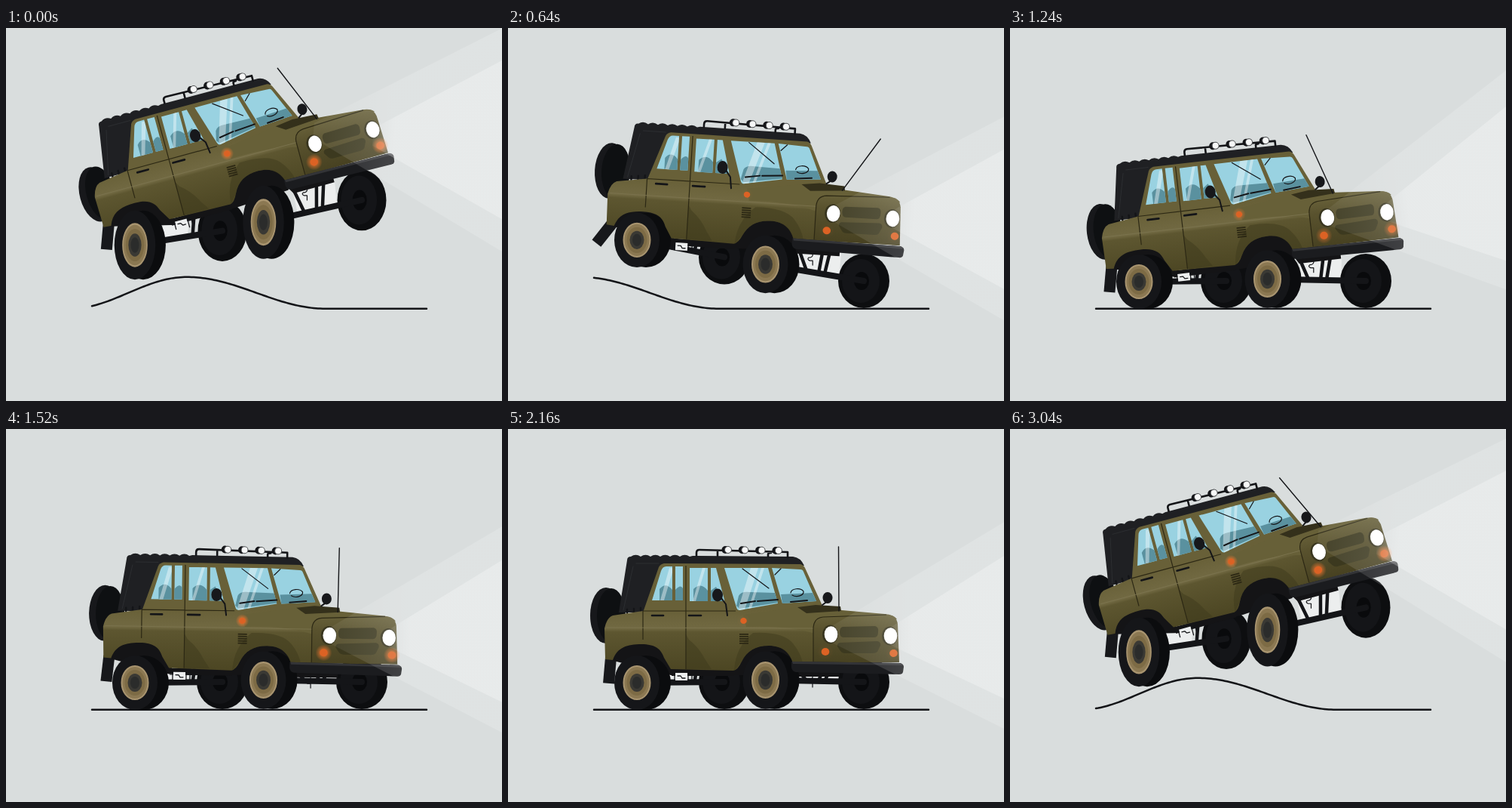
Animation of 658x494 px, one loop 3.08 s. Source, as an HTML page:

```html
<!DOCTYPE html>
<html lang="en">
<head>
<meta charset="utf-8">
<title>Off-road jump</title>
<style>
html, body { margin: 0; width: 100%; height: 100%; overflow: hidden; background: #d9dddd; }
svg { display: block; width: 100vw; height: 100vh; }
.line { fill: none; stroke: #141518; stroke-linecap: round; stroke-linejoin: round; }
.seam { fill: none; stroke: #2c2814; stroke-width: 1.2; }
.dark { fill: #17181b; }
</style>
</head>
<body>
<svg viewBox="0 0 658 494">
  <defs>
    <linearGradient id="side" x1="0" y1="240" x2="0" y2="320" gradientUnits="userSpaceOnUse">
      <stop offset="0" stop-color="#686038"/>
      <stop offset=".3" stop-color="#716942"/>
      <stop offset=".36" stop-color="#5d5630"/>
      <stop offset="1" stop-color="#4c4623"/>
    </linearGradient>
    <linearGradient id="face" x1="0" y1="246" x2="0" y2="310" gradientUnits="userSpaceOnUse">
      <stop offset="0" stop-color="#676039"/>
      <stop offset=".3" stop-color="#59522e"/>
      <stop offset="1" stop-color="#474121"/>
    </linearGradient>
    <linearGradient id="wide" x1="428" x2="530" gradientUnits="userSpaceOnUse">
      <stop offset="0" stop-color="#fff" stop-opacity=".05"/>
      <stop offset="1" stop-color="#fff" stop-opacity=".17"/>
    </linearGradient>
    <linearGradient id="narrow" x1="507" x2="535" gradientUnits="userSpaceOnUse">
      <stop offset="0" stop-color="#fff" stop-opacity=".04"/>
      <stop offset="1" stop-color="#fff" stop-opacity=".27"/>
    </linearGradient>
    <radialGradient id="glow">
      <stop offset=".3" stop-color="#ff7a30" stop-opacity=".7"/>
      <stop offset="1" stop-color="#ff7a30" stop-opacity="0"/>
    </radialGradient>
    <g id="near">
      <ellipse cx="12" rx="33" ry="36" fill="#0b0c0e"/>
      <ellipse rx="30" ry="36" fill="#151619"/>
      <ellipse rx="17.5" ry="22" fill="#8b7852" stroke="#a8946f" stroke-width="2"/>
      <ellipse rx="13.5" ry="17" fill="#7d6b45"/>
      <ellipse rx="9.5" ry="12" fill="#3a3934"/>
      <ellipse rx="6" ry="8" fill="#2b2c2b"/>
    </g>
    <g id="far">
      <ellipse rx="34" ry="36" fill="#0d0e10"/>
      <ellipse cx="-4" rx="25" ry="29" fill="#141518"/>
      <ellipse cx="-3" rx="10" ry="12" fill="#090a0c"/>
    </g>
    <g id="roofLamp">
      <circle cx="-2.5" r="5" fill="#141518"/>
      <circle cx="1" r="4.5" fill="#f6f7f7" stroke="#4a4c4e"/>
    </g>
    <g id="signal">
      <circle class="glow" r="11" fill="url(#glow)"/>
      <ellipse rx="5.3" ry="5" fill="#dc6224"/>
    </g>
    <g id="headlight">
      <ellipse cx="-1" rx="10.5" ry="12.5" fill="#38351f"/>
      <ellipse rx="8.8" ry="10.8" fill="#fff"/>
    </g>
  </defs>

  <path id="road" class="line" stroke-width="2.5"/>
  <path id="gaps" fill="#eceeee"/>
  <use id="farRear" href="#far"/>
  <use id="farFront" href="#far"/>
  <path id="axles" class="line" stroke-width="8"/>
  <path id="shocks" class="line" stroke-width="4.5"/>
  <path id="hose" class="line" stroke-width="1.2"/>

  <!-- underside, behind the near wheels -->
  <g class="body">
    <path id="flap" class="dark" d="M129 303H144V337H129Z"/>
    <path fill="#141416" d="M136 306L148 280H205L220 318H300L318 282H368L384 314L378 322L310 326H216ZM217 318H300V327H217ZM378 318H440V328H384Z"/>
    <path fill="#eceeee" d="M222 323H238V333H222Z"/>
    <path class="line" stroke-width="1.3" d="M221 333V322M225 327H229L231 330H235M239 322V335M244 322V333"/>
    <g id="spare">
      <ellipse class="dark" cx="130" cy="247" rx="21" ry="37"/>
      <ellipse cx="137" cy="247" rx="19" ry="36" fill="#0e1012"/>
    </g>
  </g>

  <use id="rear" href="#near"/>
  <use id="front" href="#near"/>

  <g class="body">
    <path id="canvas" fill="#1f2023"/>
    <path class="line" style="stroke:#2c2e31" d="M166 182L153 240M170 178H200"/>
    <path class="line" stroke-width="2.5" d="M158 239V244M167 238V243M176 237V242"/>

    <g id="rack">
      <path class="line" stroke-width="2.6" d="M250 168V164Q250 160 254 160L371 163V170M278 161V168M345 169V166Q345 164 349 164"/>
    </g>

    <!-- cabin -->
    <path fill="#686038" d="M179 243L200 183Q202 179 207 178L388 179Q392 180 394 184L418 236L400 254H179Z"/>
    <path fill="#99d2e1" d="M191 227L203 188Q205 182 210 182H218V227ZM222 182H232V227H222ZM241 184H265V228H241ZM269 184H276L287 226V228H269Z
      M287 184H345L358 231L307 240Q304 240 303 236ZM350 184L388 186Q391 186 392 189L409 228L364 231Z"/>
    <path fill="#5a919f" d="M201 227V212Q209 202 218 213V227ZM222 213Q229 205 232 211V227H222ZM246 228V212Q256 202 265 214V228ZM269 214L276 209L286 226V228H269Z
      M306 221Q309 215 320 216L354 217L358 230L307 238L303 234ZM362 219L404 217L409 228L364 231Z"/>
    <path fill="#fff" opacity=".4" d="M322 184H332L314 239L307 240L306 236ZM336 184H340L323 237L319 238ZM214 184H218V190L207 227H202ZM258 184H262L249 228H245Z"/>
    <path class="line" stroke-width="1.2" d="M311 185L346 211M362 185L354 193M375 217A9 6 0 0 1 392 215A9 6 0 0 1 377 220"/>
    <path class="line" stroke-width="2" d="M331 228L358 226M375 229L397 227M309 231L328 228"/>

    <!-- body panels -->
    <path fill="url(#side)" d="M128 264Q131 250 139 247L179 241H305L398 238L410 252L412 310H378C374 296 364 287 346 287C328 287 317 294 310 308
      Q305 319 299 320L216 318L207 303C203 291 195 285 177 285C158 285 145 289 139 306L129 305Z"/>
    <path fill="#3e3a1c" opacity=".5" d="M240 279Q254 290 262 306L270 318L236 318V272ZM325 270Q365 268 378 284Q388 296 391 310H378Q370 287 346 287Q320 287 310 308L300 320Q302 288 325 270Z"/>
    <path fill="#676038" d="M312 246L383 236L443 240L500 245Q512 246 516 252L412 256L404 270Q370 260 316 262Z"/>
    <path fill="#34301b" d="M384 236L408 233L441 235L442 241L396 244Z"/>
    <path fill="url(#face)" d="M405 263Q406 250 418 249L502 246Q515 246 517 258L519 309H405Z"/>
    <path fill="#3c391f" d="M444 262L487 261Q492 262 491 269Q491 276 486 276H445Q440 276 440 269Q440 263 444 262Z
      M440 283L490 281Q495 282 494 287L490 295Q488 297 484 297H447Q443 297 441 294L437 288Q436 284 440 283Z"/>
    <path class="seam" d="M405 308V263Q406 250 418 249L502 246M179 241V279M236 181V318M179 241H302"/>
    <path class="line" stroke-width=".8" style="stroke:#7d7550" d="M131 263L404 264"/>
    <path class="line" stroke-width="2.7" d="M191 247H206M240 247H256"/>
    <path class="seam" style="stroke-width:12" stroke-dasharray="1.8 1.2" d="M313 271V285"/>

    <!-- bumper -->
    <path fill="#1b1c1f" d="M376 308L520 310Q525 311 525 315L524 322Q523 325 519 325L382 322Q377 321 376 316Z"/>
    <path fill="#333437" d="M377 308L521 310L524 313L378 311Z"/>

    <!-- mirrors -->
    <path class="line" stroke-width="2" d="M283 224L289 232L291 247M424 228L417 233"/>
    <ellipse class="dark" cx="278" cy="220" rx="7" ry="8.5"/>
    <ellipse class="dark" cx="424" cy="223.500" rx="6.500" ry="7.500"/>

    <!-- lights -->
    <use href="#headlight" x="428.500" y="272"/>
    <use href="#headlight" x="507.500" y="274"/>
    <use href="#signal" x="421" y="295"/>
    <use href="#signal" x="511.500" y="297"/>
    <use href="#signal" transform="translate(312.5 254) scale(.8)"/>

    <path id="antenna" class="line" stroke-width="1.4" d="M439 241L438.500 156"/>
    <g id="beam">
      <path fill="url(#wide)" d="M428 262L950 -53V543L428 282Z"/>
      <path fill="url(#narrow)" d="M507 263L950 -16V494L507 286Z"/>
    </g>
  </g>
</svg>
<script>
const LOOP = 3080, GROUND = 371.8;
const $ = id => document.getElementById(id);
const set = (id, value, name = 'transform') => $(id).setAttribute(name, value);

// Each wheel flies on its own parabola between leaving and touching the ground.
const wheels = {
  rear: { x: 171, y: 336, size: 1, give: .27, start: -200, land: 880, height: 80 },
  front: { x: 341.5, y: 332.5, size: 1.06, give: .27, start: -240, land: 690, height: 98 },
  farRear: { x: 287, y: 335, size: 1, give: .12, start: -220, land: 730, height: 93 },
  farFront: { x: 472, y: 335, size: 1, give: .12, start: -300, land: 640, height: 123 }
};
const frame = { start: -260, land: 720, height: 111 };

const clamp = u => Math.max(0, Math.min(1, u));
const mix = (p, q, f) => p.map((v, i) => v + (q[i] - v) * f);

function ramp(t, from, to) {
  const u = clamp((t - from) / (to - from));
  return u * u * (3 - 2 * u);
}
const pulse = (t, a, b, c, d) => ramp(t, a, b) - ramp(t, c, d);

function hop(t, { start, land, height }) {
  const u = clamp((t - start) / (land - start));
  return -4 * height * u * (1 - u);
}

// Rocking that starts at `zero` and dies away after the landing.
const swing = (t, size, zero, half) =>
  t < zero ? 0 : size * Math.sin(Math.PI * (t - zero) / half) * (1 - ramp(t, 1100, 1600));

// The bump rushes in, then slides on slowly while the car is in the air.
const bumpAt = t => 240 - .225 * t + 480 * (1 - ramp(t, -300, -40)) - 110 * ramp(t, 640, 1200);

function lift(x, bump) {
  const u = (x - bump) / (x < bump ? 155 : 185);
  return Math.abs(u) < 1 ? 21 * (1 + Math.cos(Math.PI * u)) : 0;
}

function draw(now) {
  // Time runs from the middle of the jump; negative before it.
  const clock = now % LOOP, t = clock < 1760 ? clock : clock - LOOP;
  const bump = bumpAt(t);
  const squat = -2.3 * pulse(t, -760, -520, 0, 600);
  const rock = swing(t, 11.5, 605, 365);
  const tilt = squat + rock - 12.9 * pulse(t, -260, -30, 40, 640);
  const whip = 1.5 * squat + swing(t, 37, 389, 502) - 38 * pulse(t, -260, -50, -100, 400);
  const aim = squat + rock + 8.2 * pulse(t, -260, -50, -150, 400);
  const dx = 1.35 * tilt, dy = hop(t, frame) + 1.2 * Math.min(0, squat + rock);

  let road = '';
  for (let x = 114; x <= 558; x += 3) road += `${road ? 'L' : 'M'}${x} ${GROUND - lift(x, bump)}`;
  set('road', road, 'd');

  const hubs = {}, air = pulse(t, -240, -60, 100, 680);
  for (const name in wheels) {
    const w = wheels[name], stretch = 1 + w.give * air;
    const y = w.y + Math.min(hop(t, w), -lift(w.x, bump));
    hubs[name] = [w.x, y];
    set(name, `translate(${w.x} ${y}) scale(${stretch ** -.4} ${stretch * w.size})`);
  }

  const pose = new DOMMatrix().translate(320 + dx, 250 + dy).rotate(tilt).translate(-320, -250);
  document.querySelectorAll('.body').forEach(g => g.setAttribute('transform', pose));
  const onBody = (x, y = 318) => {
    const p = pose.transformPoint({ x, y });
    return [p.x, p.y];
  };

  const { rear, front, farRear, farFront } = hubs;
  const frontAxle = f => mix(front, farFront, f), rearAxle = f => mix(rear, farRear, f);
  set('axles', `M${rear}L${farRear}M${front}L${farFront}`, 'd');
  set('gaps', `M${onBody(384)}L${onBody(442)}L${frontAxle(.75)}L${frontAxle(.35)}Z
    M${onBody(208)}L${onBody(244)}L${rearAxle(.6)}L${rearAxle(.3)}Z`, 'd');
  const strut = (x, end) => `M${onBody(x)}L${end}`;
  set('shocks', strut(384, frontAxle(.42)) + strut(418, frontAxle(.54)) + strut(428, frontAxle(.6)) + strut(250, rearAxle(.66)), 'd');
  set('hose', `M${onBody(404, 322)}v7q-1 3 -5 3q-3 2 1 4h4v6`, 'd');

  set('spare', `translate(0 ${-.36 * whip})`);
  set('antenna', `rotate(${whip - tilt} 439 240)`);
  set('beam', `rotate(${aim - tilt} 480 273)`);
  set('flap', `rotate(${5 + Math.max(0, whip) * .9 - tilt} 137 303)`);
  const flash = .5 + .5 * Math.cos(clock / LOOP * 4 * Math.PI);
  document.querySelectorAll('.glow').forEach(g => g.setAttribute('opacity', flash));
}

set('canvas', `M158 174Q158 169 163 169${'q6.500 -4.500 13 0'.repeat(6)}L245 168L378 169Q388 170 393 181L204 183L181 243H147Z`, 'd');
for (let i = 0; i < 4; i++)
  $('rack').insertAdjacentHTML('beforeend', `<use href="#roofLamp" x="${291 + 22.3 * i}" y="${160 + i / 3}"/>`);

function tick() {
  draw(performance.now());
  requestAnimationFrame(tick);
}
tick();
</script>
</body>
</html>
```
